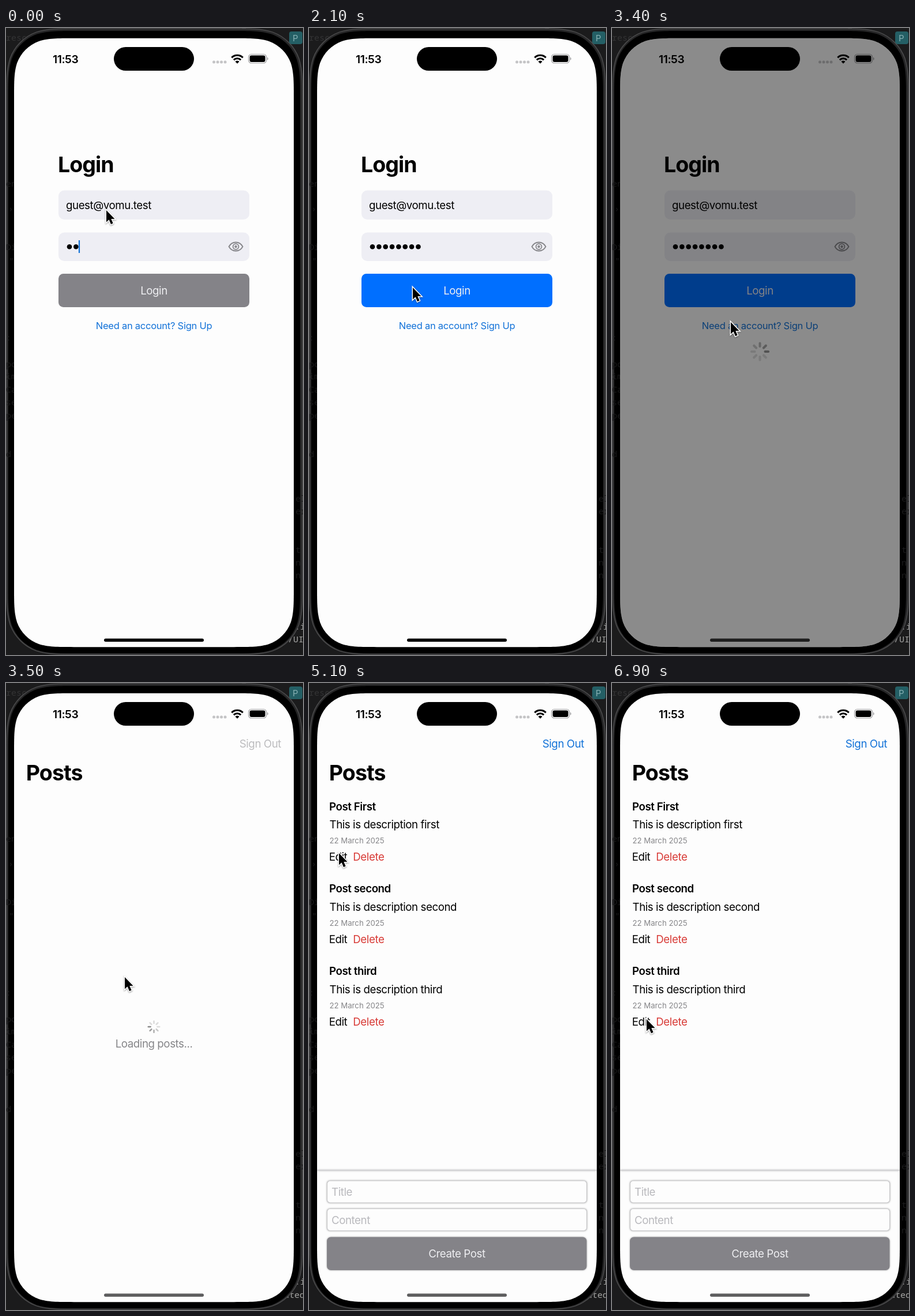
An HTML page that plays this animation: 515x1087 px, repeating every 7 s.

```html
<!DOCTYPE html>
<html lang="en">
<head>
<meta charset="utf-8">
<title>Login and posts</title>
<style>
  html, body { margin: 0; height: 100%; overflow: hidden; background: #1b1b1c; }
  svg { display: block; width: 515px; height: 1087px; }
  text { font: 18.7px Inter, sans-serif; letter-spacing: -.023em; font-optical-sizing: none; white-space: pre; }
  .big { font-size: 37.5px; font-weight: 700; letter-spacing: -.025em; }
  .head { font-weight: 600; }
  .date { font-size: 13.2px; letter-spacing: 0; fill: #858588; }
  .link { fill: #1272d8; }
  .small { font-size: 16.5px; letter-spacing: -.015em; }
  .mid { text-anchor: middle; }
  .label { fill: #efeff2; }
  .hint { fill: #b9b9bd; }
  .field { fill: #eeeef4; }
  .gray { fill: #848388; }
  .box { fill: #fdfdfd; stroke: #c9c9cb; stroke-width: 1.2; }
  .lift { filter: drop-shadow(0 0 1.5px #0005); }
  .code text { font: 15px "Noto Sans Mono", monospace; letter-spacing: 0; }
</style>
</head>
<body>
<svg viewBox="0 0 515 1087">
  <!-- dim editor behind the phone -->
  <rect width="515" height="1087" fill="#1b1b1c"/>
  <path d="M0 107H515" stroke="#111"/>
  <rect x="409" width="7" height="8" fill="#3a3a3b"/>
  <rect x="491" y="6" width="23" height="22" rx="4" fill="#245f65"/>
  <text x="497" y="22.500" font-weight="600" style="font-size:15px" fill="#86b0b3">P</text>
  <g class="code" fill="#343435"><text x="0" y="22">resc</text></g>
  <g class="code" fill="#a5a5a3">
    <text id="codeA" x="480" y="1065">t/UI</text>
    <text id="codeB" x="473" y="1066">cated</text>
    <text x="501" y="1043">.i</text>
  </g>

  <!-- phone body -->
  <path id="body" fill="#262627" stroke="#4b4b4c" stroke-width="1.500"/>
  <path id="bezel"/>
  <g id="edge" class="code" fill="#1a1a1b"></g>
  <path id="screen" fill="#fdfdfd"/>

  <g id="login">
    <text class="big" x="90" y="250">Login</text>
    <rect class="field" x="91" y="281.500" width="331" height="50.500" rx="10"/>
    <text x="104" y="314">guest@vomu.test</text>
    <rect class="field" x="91" y="354.500" width="331" height="49.500" rx="10"/>
    <g id="dots"></g>
    <rect id="caret" y="368" width="2.200" height="22" fill="#1272d8"/>
    <g fill="none" stroke="#858589" stroke-width="1.800">
      <path d="M386.500 379C392 369 405 369 410.500 379C405 389 392 389 386.500 379Z"/>
      <circle cx="398.500" cy="379" r="4.900"/>
      <circle cx="398.500" cy="379" r="1.300"/>
    </g>
    <rect id="button" x="91" y="426" width="331" height="58" rx="8.500"/>
    <text class="mid label" x="256.500" y="462">Login</text>
    <text class="mid link small" x="256.500" y="522">Need an account? Sign Up</text>
  </g>

  <g id="posts">
    <text id="signOut" x="477" y="111.500" text-anchor="end">Sign Out</text>
    <text class="big" x="34.800" y="169">Posts</text>
    <text id="loading" class="mid" x="256.500" y="632" fill="#858588">Loading posts...</text>
    <g id="list">
      <g id="rows"></g>
      <path class="lift" d="M14.500 844.800H498.500" stroke="#d0d0d2" stroke-width="1.500"/>
      <g class="lift">
        <rect class="box" x="31.500" y="863" width="450" height="38" rx="5"/>
        <rect class="box" x="31.500" y="911.500" width="450" height="38" rx="5"/>
        <rect class="gray" x="31" y="960.500" width="450.500" height="57.500" rx="7"/>
      </g>
      <text class="hint" x="39" y="889">Title</text>
      <text class="hint" x="39" y="937.500">Content</text>
      <text class="mid label" x="256.500" y="996">Create Post</text>
    </g>
  </g>

  <!-- status bar -->
  <text class="head" x="81" y="61" style="font-size:19.300px">11:53</text>
  <rect x="187" y="33" width="139" height="41" rx="20.500"/>
  <g fill="#c4c4c6">
    <circle cx="360.500" cy="59" r="2.500"/><circle cx="367" cy="59" r="2.500"/>
    <circle cx="373.500" cy="59" r="2.500"/><circle cx="380" cy="59" r="2.500"/>
  </g>
  <path d="M391.300 51.300A13.700 13.700 0 0 1 410.700 51.300M394.900 55.300A8.600 8.600 0 0 1 407.100 55.300"
    fill="none" stroke="#000" stroke-width="3.200"/>
  <path d="M401 61.800L397.500 58.200A5 5 0 0 1 404.500 58.200Z"/>
  <rect x="420.500" y="45.500" width="31" height="15.500" rx="5" fill="none" stroke="#a2a2a4" stroke-width="1.200"/>
  <rect x="422.500" y="47.500" width="27" height="11.500" rx="3.300"/>
  <path d="M452.800 50.500a3 3 0 0 1 0 5.500z" fill="#a2a2a4"/>

  <path id="dim" opacity=".45"/>
  <rect id="home" x="170" y="1058.500" width="173" height="5.500" rx="2.750"/>
  <g id="spinner" stroke-linecap="round" stroke-width="2.700"></g>
  <path id="cursor" d="M0 0V20.500L4.600 16.300L8 24.200L11.600 22.600L8.300 15H14.500Z" stroke="#fff" stroke-width="3"
    paint-order="stroke" style="filter:drop-shadow(0 1px 1px #0006)"/>
</svg>
<script>
const $ = id => document.getElementById(id);
const show = (id, on) => $(id).setAttribute('display', on ? 'inline' : 'none');
const set = (id, name, value) => $(id).setAttribute(name, value);

const LOOP = 7000, DIM = 2200, POSTS = 3500, LISTED = 3800;
const typedAt = [200, 400, 600, 900, 1100, 1300];
// pointer stops: time, x, y
const path = [
  [0, 174, 316], [1300, 174, 316], [1800, 180, 450], [2500, 180, 450],
  [3200, 206, 510], [3900, 206, 510], [4700, 52, 295], [5100, 52, 295],
  [5250, 33, 205], [5450, 62, 606], [5650, 105, 305], [5850, 96, 310],
  [6400, 60, 583], [LOOP, 60, 583]
];

// rectangle whose corners ease into the straight sides
function smoothRect(x, y, w, h, r) {
  const a = 1.529 * r, b = 1.088 * r, c = .868 * r, d = .631 * r, e = .373 * r, f = .169 * r, g = .075 * r;
  const half = [[0, a], [0, b], [0, c], [g, d], [f, e], [e, f], [d, g], [c, 0], [b, 0], [a, 0]];
  const corner = (flipX, flipY) => {
    const pts = half.map(([u, v]) => [x + (flipX ? w - u : u), y + (flipY ? h - v : v)]);
    if (flipX !== flipY) pts.reverse();
    return `${pts[0]}C${pts.slice(1).join(' ')}`;
  };
  return `M${corner(false, false)}L${corner(true, false)}L${corner(true, true)}L${corner(false, true)}Z`;
}
const screen = smoothRect(14, 17.8, 485, 1055.4, 68);
set('body', 'd', smoothRect(1, 1, 513, 1085, 82));
set('bezel', 'd', smoothRect(4, 5, 506, 1079, 78));
set('screen', 'd', screen);
set('dim', 'd', screen);

const edgeText = [
  [0, 275, 'en'], [4, 319, '›'], [0, 385, 'Di'], [5, 409, '"'], [0, 542, ':'],
  [0, 588, 'po'], [0, 609, 'im'], [0, 632, 'Ca'], [0, 654, 'se'], [0, 677, 'pe'], [0, 744, 'd'],
  [502, 821, 'el'], [502, 843, 'er'], [502, 910, 't'], [502, 932, 'n'], [502, 954, 'n']
];
$('edge').innerHTML = edgeText.map(([x, y, s]) => `<text x="${x}" y="${y}">${s}</text>`).join('');

$('rows').innerHTML = ['First', 'second', 'third'].map((name, i) => `
  <g transform="translate(0 ${i * 142.8})">
    <text class="head" x="35" y="220.5">Post ${name}</text>
    <text x="35.500" y="252">This is description ${name.toLowerCase()}</text>
    <text class="date" x="35.500" y="278">22 March 2025</text>
    <text x="34.700" y="308">Edit</text>
    <text x="76.300" y="308" fill="#d83b37">Delete</text>
  </g>`).join('');

$('dots').innerHTML = Array.from({ length: 8 }, (_, i) =>
  `<circle cx="${110 + i * 11.35}" cy="379.300" r="4.300"/>`).join('');
$('spinner').innerHTML = Array.from({ length: 8 }, (_, i) =>
  `<path d="M0 -6V-9.700" transform="rotate(${i * 45})"/>`).join('');

function pointer(t) {
  const i = path.findIndex(p => p[0] > t);
  const [t0, x0, y0] = path[i - 1], [t1, x1, y1] = path[i];
  const u = (t - t0) / (t1 - t0), e = u * u * (3 - 2 * u);
  return [x0 + (x1 - x0) * e, y0 + (y1 - y0) * e];
}

function spin(t, dimmed) {
  const head = Math.floor(t / 100) + (dimmed ? 0 : 3);
  const [dark, light] = dimmed ? [82, 122] : [138, 220];
  [...$('spinner').children].forEach((spoke, i) => {
    const age = (head - i) % 8;
    const c = Math.round(dark + (light - dark) * Math.min(1, age / 4));
    spoke.setAttribute('stroke', `rgb(${c},${c},${c})`);
  });
  set('spinner', 'transform', dimmed ? 'translate(256.5 561) scale(1.5)' : 'translate(256.5 596)');
}

function draw(now) {
  const t = Math.floor(now % LOOP / 100) * 100;
  const posts = t >= POSTS, listed = t >= LISTED, dimmed = t >= DIM && !posts;
  const typed = 2 + typedAt.filter(k => k <= t).length;

  show('login', !posts);
  show('posts', posts);
  show('list', listed);
  show('loading', !listed);
  show('dim', dimmed);
  show('spinner', t >= DIM && !listed);
  show('caret', t < 1900);
  show('codeA', !posts);
  show('codeB', posts);

  [...$('dots').children].forEach((dot, i) => dot.setAttribute('display', i < typed ? 'inline' : 'none'));
  set('caret', 'x', 103.2 + typed * 11.35);
  set('button', 'fill', typed < 6 ? '#848388' : '#006fff');
  set('signOut', 'fill', listed ? '#1272d8' : '#bcbcbe');
  set('home', 'fill', posts ? '#5e5e5f' : dimmed ? '#1d1d1d' : '#000');
  if (!listed) spin(Math.max(t, DIM), dimmed);
  set('cursor', 'transform', `translate(${pointer(t)})`);
}

const start = performance.now();
function tick() {
  draw(performance.now() - start);
  requestAnimationFrame(tick);
}
tick();
</script>
</body>
</html>
```
